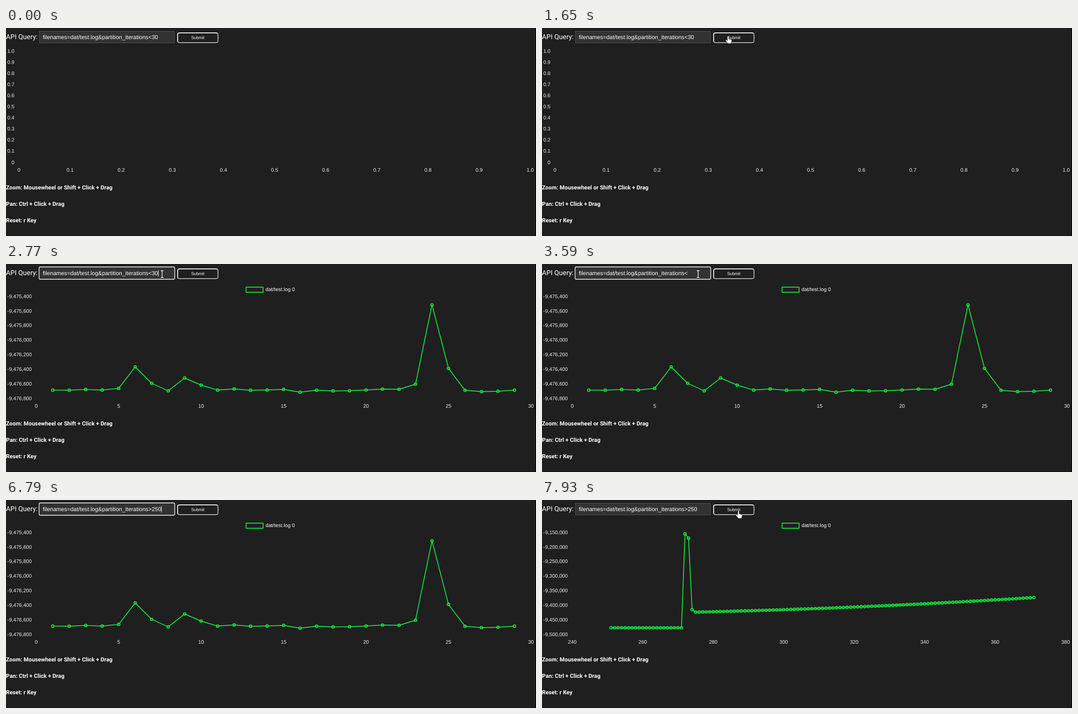
An HTML page for the animation above (8000 ms loop, 1195 px wide and 469 px high).

```html
<!DOCTYPE html>
<html lang="en">
<head>
<meta charset="utf-8">
<title>API query chart</title>
<style>
  html, body { margin: 0; width: 100%; height: 100%; overflow: hidden; background: #1f1f1f; }
  svg { position: absolute; left: 0; top: 0; text-rendering: geometricPrecision; }
  text { fill: #fff; font: 11.52px "Liberation Sans", Arial, sans-serif; white-space: pre; }
  .label { font: 15.36px Roboto, sans-serif; }
  .help { font: bold 12.75px Roboto, sans-serif; }
  #query { font-size: 12.8px; }
  .submit { font-size: 9.6px; }
  .tick { fill: #eee; }
  .line { fill: none; stroke: #14e63c; stroke-width: 1.92; stroke-linejoin: round; }
  .dot { fill: rgba(0, 0, 0, .1); stroke: #14e63c; stroke-width: 1.92; }
  #button { position: absolute; left: 386px; top: 9.5px; width: 92.5px; height: 24px; box-sizing: border-box;
    border: 2px solid; border-color: #f4f4f4 #b0b0b0 #b0b0b0 #f4f4f4; border-radius: 5px; }
  #button.down { border-color: #b0b0b0 #f4f4f4 #f4f4f4 #b0b0b0; }
</style>
</head>
<body>
<div id="button"></div>
<svg width="1195" height="469" viewBox="0 0 1195 469">
  <path d="M1193 0h2v469h-2z" fill="#0a0a0a"/>
  <path d="M0 468h1195v1H0z" fill="#151515"/>
  <text class="label" x="0" y="25.3">API Query:</text>
  <rect x="75.5" y="7.5" width="304" height="26" fill="#323232" stroke="#555"/>
  <rect id="focus" x="74.5" y="6.5" width="306" height="28" rx="3" fill="none" stroke="#fff" stroke-width="1.3"/>
  <text id="query" x="83" y="25.1"></text>
  <rect id="caret" y="14" width="1" height="14" fill="#fff"/>
  <text class="submit" x="432.4" y="25.1" text-anchor="middle">Submit</text>
  <text class="help" x="0" y="363.7">Zoom: Mousewheel or Shift + Click + Drag</text>
  <text class="help" x="0" y="401.2">Pan: Ctrl + Click + Drag</text>
  <text class="help" x="0" y="438">Reset: r Key</text>
  <g id="charts"></g>
  <g id="legend">
    <rect class="line" x="541.3" y="52.3" width="38.4" height="11.5"/>
    <text x="585.3" y="61.2">dat/test.log 0</text>
  </g>
  <g id="cursor">
    <path id="arrow" d="M0 0V14L3.3 11 5.6 16.2 8 15.1 5.8 10H10Z" fill="#111" stroke="#fff" stroke-width="1.2"/>
    <path id="beam" d="M-3-7.5h2L0-6.5 1-7.5H3M0-6.5V7M-3 8h2L0 7 1 8H3" fill="none" stroke="#fff" stroke-width="1.4"/>
    <path id="hand" d="M-1.5 1.2a1.5 1.5 0 0 1 3 0V6.2l5.2 1.2q1.8.6 1.6 2.4l-.9 4.6q-.4 2-2.4 2H1q-1.4 0-2.4-1.4l-4-5q-.4-1.4 1-1.8q1 0 2.9 1.8Z" fill="#fff" stroke="#111" stroke-width=".6"/>
  </g>
</svg>
<script>
const $ = id => document.getElementById(id);
const range = (n, f) => Array.from({ length: n }, (_, i) => f(i));
const show = (el, on) => el.style.display = on ? '' : 'none';
const tick = (x, y, label, anchor) =>
  `<text class="tick" x="${x}" y="${y}" text-anchor="${anchor}">${label}</text>`;

// xs and ys: [first position, spacing, labels]
function addChart(xs, ys, right, points) {
  const g = document.createElementNS('http://www.w3.org/2000/svg', 'g');
  g.innerHTML =
    ys[2].map((s, i) => tick(right, ys[0] + i * ys[1], s, 'end')).join('') +
    xs[2].map((s, i) => tick(xs[0] + i * xs[1], 324, s, 'middle')).join('') +
    `<polyline class="line" points="${points.join(' ')}"/>` +
    points.map(([x, y]) => `<circle class="dot" cx="${x}" cy="${y}" r="2.9"/>`).join('');
  $('charts').append(g);
  return g;
}

const tenth = i => i ? (i / 10).toFixed(1) : '0';
const thousands = n => n.toLocaleString('en-US');

const early = [284.4, 284.5, 282.9, 284.2, 280.4, 232, 269, 286, 257, 273, 284.3, 281.7, 284.7, 284, 282.7,
  289, 284.5, 286.2, 285.8, 284, 282, 282.5, 271, 92, 235.3, 284.7, 287.8, 287, 284.4];

function lateY(n) {
  if (n < 272) return 288;
  if (n < 275) return [76.4, 86, 247][n - 272];
  const u = (n - 275) / 96;
  return 252.8 - 17 * u - 16 * u * u;
}

const charts = [
  addChart([29.2, 115.28, range(11, tenth)], [56.1, 25.04, range(11, i => tenth(10 - i))], 19, []),
  addChart([68.2, 185.9, range(7, i => i * 5)],
    [76.8, 32.83, range(8, i => thousands(-9475400 - i * 200))], 58.2,
    early.map((y, i) => [68.2 + 37.18 * (i + 1), y])),
  addChart([68.2, 158.9, range(8, i => 240 + i * 20)],
    [76.8, 32.83, range(8, i => thousands(-9150000 - i * 50000))], 58.2,
    range(121, i => [68.2 + 7.945 * (i + 11), lateY(i + 251)]))
];

// Each row holds from its time until the next row
const chartAt = [[0, 0], [1830, 1], [7930, 2]];
const pressAt = [[0, 0], [1500, 1], [1650, 0], [7510, 1], [7670, 0]];
const focusAt = [[0, 0], [2692, 1], [7510, 0]];
const textAt = [[0, '<30'], [3440, '<3'], [3590, '<'], [3770, ''], [4250, '>'], [4920, '>3'],
  [5350, '>'], [6060, '>2'], [6650, '>25'], [6790, '>250']];
const caretAt = [[0, 0], [2770, 1], [3370, 0], [4010, 1], [5890, 0], [6300, 1], [7290, 0]];
const cursorAt = [[0, ''],
  [200, 'arrow', 651, 354], [270, 'arrow', 210, -7],
  [1090, 'beam', 265, 20], [1170, 'beam', 345, 24], [1250, 'hand', 400, 20], [1330, 'hand', 419.5, 18.5],
  [2220, 'hand', 404, 28], [2300, 'arrow', 384, 36], [2380, 'arrow', 369.5, 37.5],
  [2456, 'beam', 360, 30], [2535, 'beam', 355, 25], [2613, 'beam', 352, 22.5], [4920, ''],
  [7290, 'beam', 368, 24], [7363, 'hand', 406, 28], [7437, 'hand', 434, 26], [7510, 'hand', 443, 25]];

const at = (rows, t) => rows.filter(r => r[0] <= t).pop();

function draw(t) {
  const chart = at(chartAt, t)[1];
  charts.forEach((g, i) => show(g, i === chart));
  show($('legend'), chart > 0);
  $('button').className = at(pressAt, t)[1] ? 'down' : '';
  show($('focus'), at(focusAt, t)[1]);

  $('query').textContent = 'filenames=dat/test.log&partition_iterations' + at(textAt, t)[1];
  $('caret').setAttribute('x', Math.round(83 + $('query').getComputedTextLength()));
  show($('caret'), at(caretAt, t)[1]);

  const [, kind, x = 0, y = 0] = at(cursorAt, t);
  for (const id of ['arrow', 'beam', 'hand']) show($(id), id === kind);
  $('cursor').setAttribute('transform', `translate(${x} ${y})`);
}

const start = performance.now();
function loop() {
  draw((performance.now() - start) % 8000);
  requestAnimationFrame(loop);
}
loop();
</script>
</body>
</html>
```
